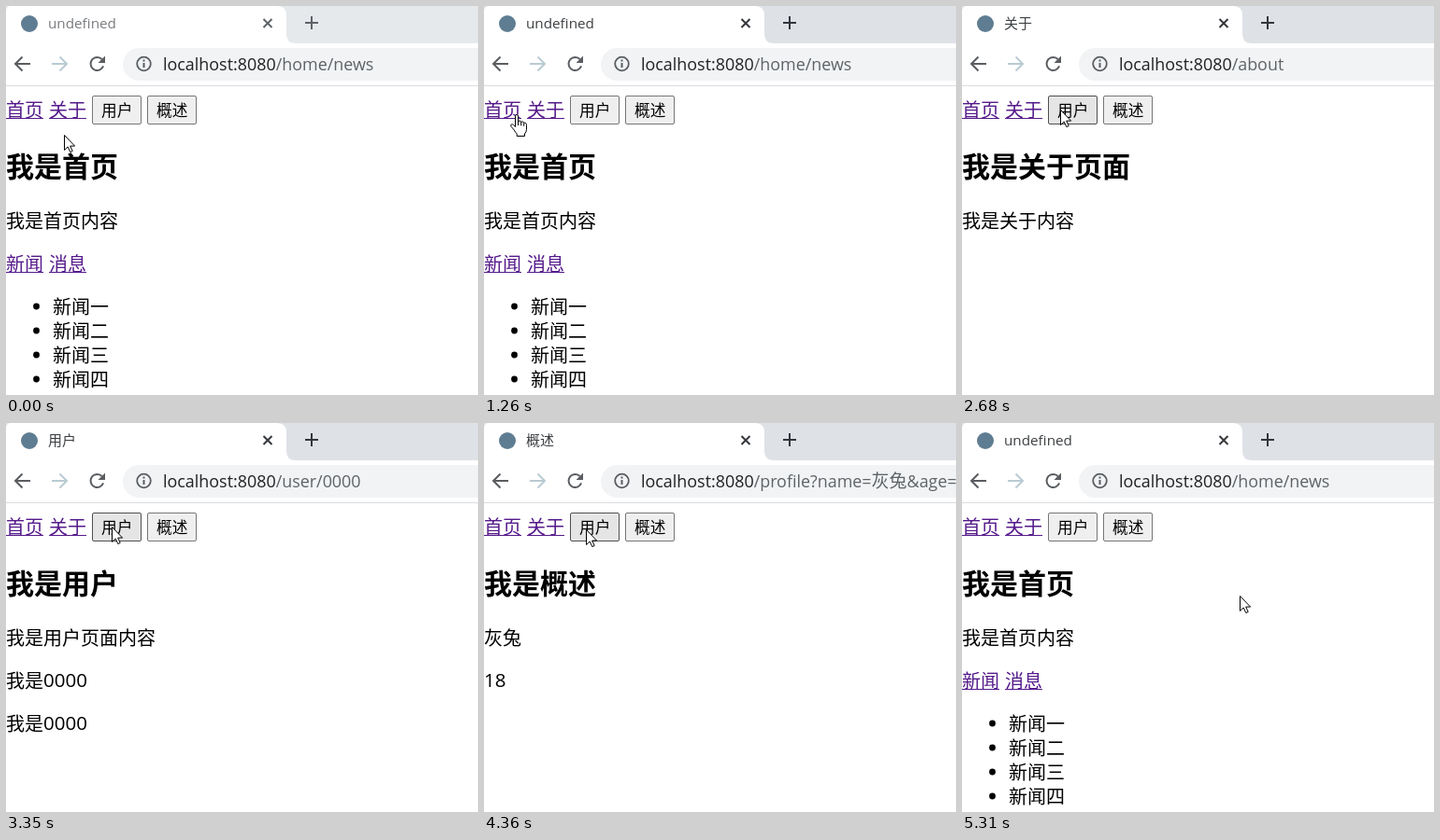
Animation of 505 by 417 pixels, one loop 5440 ms. Source, as an HTML page with a canvas:

```html
<!DOCTYPE html>
<html lang="zh">
<head>
<meta charset="utf-8">
<title>Router demo</title>
<style>
  html, body { margin: 0; width: 100%; height: 100%; overflow: hidden; background: #fff; }
  canvas { display: block; width: 505px; height: 417px; }
</style>
</head>
<body>
<canvas id="stage" width="505" height="417"></canvas>
<script>
const ctx = document.getElementById('stage').getContext('2d');
const LOOP = 5440, TICKS = 81;
const FONT = '"Open Sans", "Noto Sans CJK SC", "Noto Sans CJK", sans-serif';
const CJK = '"Noto Sans CJK SC", "Noto Sans CJK", sans-serif';

const pages = {
  home: { title: 'undefined', path: ['/home/news'], head: '我是首页', lines: ['我是首页内容'] },
  about: { title: '关于', path: ['/about'], head: '我是关于页面', lines: ['我是关于内容'] },
  user: { title: '用户', path: ['/user/0000'], head: '我是用户', lines: ['我是用户页面内容', '我是0000', '我是0000'] },
  profile: { title: '概述', path: ['/profile?name=', '灰兔', '&age=18'], head: '我是概述', lines: ['灰兔', '18'] }
};

// Times below are in ticks of the screen recorder's clock.
const origin = { x: 62, y: 138 };
const moves = [
  { from: 4, to: 5, x: 17, y: 106 },
  { from: 8, to: 10, x: 28, y: 115 },
  { from: 18, to: 19, x: 34, y: 116 },
  { from: 20, to: 23, x: 57, y: 111 },
  { from: 33, to: 40, x: 105, y: 111, sag: 7 },
  { from: 41, to: 42, x: 110, y: 111 },
  { from: 50, to: 56, x: 167, y: 118 },
  { from: 63, to: 69, x: 20, y: 108 },
  { from: 77, to: 79, x: 297, y: 185 }
];
const clicks = [
  { down: 14, open: 16, up: 16, page: 'home' },
  { down: 26, open: 28, up: 29, page: 'about' },
  { down: 45, open: 46, up: 47, page: 'user' },
  { down: 60, open: 62, up: 62, page: 'profile' },
  { down: 71, open: 74, up: 74, page: 'home' }
];

const arrowShape = new Path2D('M.5 .5V16.5L4.2 13L6.8 18.6L9.2 17.5L6.7 12.1H11.6Z');
const handShape = new Path2D('M5.5 13.5V2.2Q5.5 .5 7 .5Q8.6 .5 8.6 2.2V8.2Q8.8 7 10.2 7Q11.7 7.2 11.7 8.8Q12 7.7 13.2 7.9Q14.7 8.1 14.7 9.8Q15.1 9 16.2 9.3Q17.5 9.7 17.5 11.5V16.5Q17.5 19 15.5 21V23.5H7.2V21Q5.5 19.5 4.3 17L1.1 13.3Q.1 11.8 1.4 10.9Q2.6 10.3 3.7 11.6Z');
const handLines = new Path2D('M8.6 8V12M11.7 9V12.3M14.7 10V12.8');

const ease = p => p * p * (3 - 2 * p);

function pointerAt(tick) {
  let { x, y } = origin;
  for (const m of moves) {
    if (tick < m.from) break;
    const p = ease(Math.min(1, (tick - m.from + 1) / (m.to - m.from + 1)));
    x += (m.x - x) * p;
    y += (m.y - y) * p + (m.sag || 0) * Math.sin(Math.PI * p);
  }
  const down = clicks.some(c => tick >= c.down && tick < c.up);
  return { x: Math.round(x), y: Math.round(y), down };
}

function pageAt(tick) {
  const opened = clicks.filter(c => tick >= c.open).pop();
  return pages[opened ? opened.page : 'home'];
}

function text(str, x, y, size, color = '#000', font = FONT, weight = 400) {
  ctx.font = `${weight} ${size}px ${font}`;
  ctx.fillStyle = color;
  ctx.fillText(str, x, y);
  return x + ctx.measureText(str).width;
}

function line(color, width, ...points) {
  ctx.strokeStyle = color;
  ctx.lineWidth = width;
  ctx.beginPath();
  points.forEach(([x, y], i) => i ? ctx.lineTo(x, y) : ctx.moveTo(x, y));
  ctx.stroke();
}

function rect(color, x, y, w, h) {
  ctx.fillStyle = color;
  ctx.fillRect(x, y, w, h);
}

function disc(color, x, y, r) {
  ctx.fillStyle = color;
  ctx.beginPath();
  ctx.arc(x, y, r, 0, Math.PI * 2);
  ctx.fill();
}

function arc(color, width, x, y, r, from, to) {
  ctx.strokeStyle = color;
  ctx.lineWidth = width;
  ctx.beginPath();
  ctx.arc(x, y, r, from, to);
  ctx.stroke();
}

function inside(p, x, y, w, h) {
  return p.x >= x && p.x <= x + w && p.y >= y && p.y <= y + h;
}

const overLink = (p, x) => inside(p, x, 98, 40, 26);

function drawTabs(title, focused) {
  const ink = focused ? '#3c4043' : '#787b7f';
  const dark = focused ? '#33363a' : '#5f6368';
  ctx.fillStyle = focused ? '#dee1e6' : '#e5e9ec';
  ctx.fill(new Path2D('M290 0Q300 0 300 10V30Q300 40 310 40H505V0ZM0 0H4Q0 1 0 6Z'));
  disc('#5f7d92', 25, 19, 9);
  text(title, 45, 24, title === 'undefined' ? 15.25 : 15, ink);
  for (const side of [-1, 1]) {
    line(dark, 1.9, [280 - 4.5 * side, 14], [280 + 4.5 * side, 23]);
  }
  line(dark, 2, [320, 18], [334, 18]);
  line(dark, 2, [327, 11], [327, 25]);
}

function drawArrow(color, tip, dir) {
  line(color, 2, [tip - 16 * dir, 62], [tip, 62]);
  line(color, 2, [tip - 7.5 * dir, 54.5], [tip, 62], [tip - 7.5 * dir, 69.5]);
}

function drawToolbar(path) {
  const ink = '#5a5d61';
  drawArrow(ink, 10, -1);
  drawArrow('#bacbd3', 65, 1);
  arc(ink, 2, 97.5, 62, 7, .35, Math.PI * 1.75);
  ctx.fillStyle = ink;
  ctx.fill(new Path2D('M106 53.5V61H98.5Z'));

  ctx.fillStyle = '#f1f3f4';
  ctx.beginPath();
  ctx.roundRect(125, 45, 420, 35, 17.5);
  ctx.fill();
  arc(ink, 1.8, 147.5, 62, 7.3, 0, Math.PI * 2);
  rect(ink, 146.5, 61, 2, 5);
  rect(ink, 146.5, 57.5, 2, 2);

  let x = text('localhost:8080', 168, 69, 17.9, '#202124');
  for (const part of path) {
    x = text(part, x, 69, /^[\x20-\x7e]/.test(part) ? 17.9 : 19, '#5f6368');
  }
  rect('#dadce0', 0, 85, 505, 1);
}

function drawLink(label, x, middle, active) {
  const color = active ? '#ee0000' : '#551a8b';
  text(label, x, middle + 7.6, 20, color, CJK);
  rect(color, x, middle + 9, 40, 1);
}

function drawButton(label, x, pointer) {
  const over = inside(pointer, x, 96, 53, 31);
  const [fill, edge] = !over ? ['#efefef', '#767676']
    : pointer.down ? ['#f5f5f5', '#8d8d8d'] : ['#e5e5e5', '#4f4f4f'];
  ctx.fillStyle = fill;
  ctx.strokeStyle = edge;
  ctx.lineWidth = 1;
  ctx.beginPath();
  ctx.roundRect(x + .5, 96.5, 52, 30, 1.5);
  ctx.fill();
  ctx.stroke();
  text(label, x + 10, 118.3, 16.67, '#000', CJK);
}

function drawPage(page, pointer) {
  drawLink('首页', 0, 111, pointer.down && overLink(pointer, 0));
  drawLink('关于', 46, 111, pointer.down && overLink(pointer, 46));
  drawButton('用户', 92, pointer);
  drawButton('概述', 151, pointer);
  text(page.head, 0, 183, 30, '#000', CJK, 700);

  page.lines.forEach((str, i) => {
    const y = 237.6 + i * 46;
    const [, words, digits] = str.match(/^(\D*)(\d*)$/);
    const x = text(words, 0, y, 20, '#000', CJK);
    text(digits, x, y - .4, 20.5);
  });

  if (page === pages.home) {
    drawLink('新闻', 0, 276);
    drawLink('消息', 46, 276);
    [...'一二三四'].forEach((n, i) => {
      const y = 322 + i * 26;
      disc('#000', 32.5, y, 3.4);
      text('新闻' + n, 50, y + 7.6, 20, '#000', CJK);
    });
  }
}

function drawPointer(p) {
  const hand = overLink(p, 0) || overLink(p, 46);
  const shape = hand ? handShape : arrowShape;
  ctx.save();
  ctx.translate(hand ? p.x - 6 : p.x, p.y);
  ctx.fillStyle = '#fff';
  ctx.strokeStyle = '#000';
  ctx.lineWidth = 1;
  ctx.fill(shape);
  ctx.stroke(shape);
  if (hand) ctx.stroke(handLines);
  ctx.restore();
  // The click highlight tints the pointer as well.
  if (p.down) disc('rgba(242, 240, 0, .52)', p.x, p.y, 15);
}

function render(now) {
  const tick = Math.floor((now % LOOP) / LOOP * TICKS + .27);
  const page = pageAt(tick);
  const pointer = pointerAt(tick);

  rect('#fff', 0, 0, 505, 417);
  drawTabs(page.title, tick >= clicks[0].down);
  drawToolbar(page.path);
  drawPage(page, pointer);
  drawPointer(pointer);
}

const start = performance.now();
function frame() {
  render(performance.now() - start);
  requestAnimationFrame(frame);
}
frame();
</script>
</body>
</html>
```
